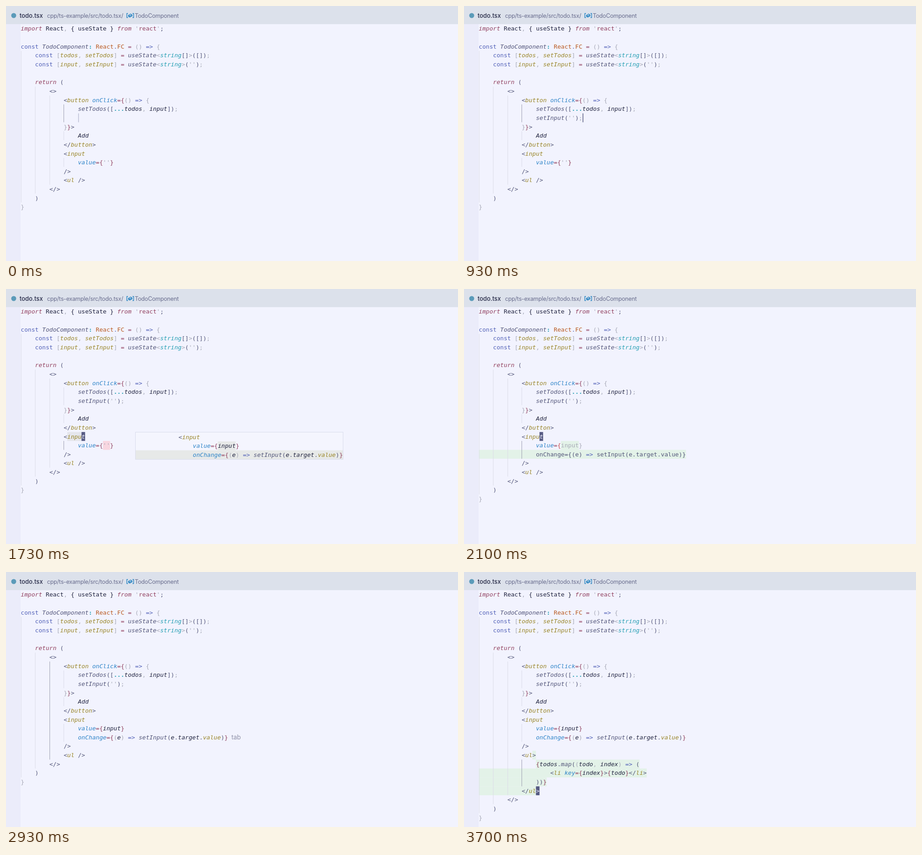
These frames come from a looping animation (997 by 562 pixels, 3.73 s). An HTML page with a canvas:

```html
<!DOCTYPE html>
<html lang="en">
<head>
<meta charset="utf-8">
<title>Editor completion</title>
<style>
html, body { margin: 0; width: 100%; height: 100%; overflow: hidden; background: #f2f3fe; }
canvas { display: block; }
</style>
</head>
<body>
<canvas id="stage" width="997" height="562"></canvas>
<script>
const ctx = document.getElementById('stage').getContext('2d');
const LOOP = 3730, LEFT = 32.6, TOP = 40.1, CHAR = 7.88, ROW = 19.65;
const MONO = '13.09px "DejaVu Sans Mono", monospace';
const SANS = 'Inter, sans-serif';
const BG = '#f2f3fe', GREEN = '#e3f2e8', PREVIEW = '#e7e9e8', PINK = '#f8d6e0';

// Event times in ms
const KEYS = [130, 220, 310], GHOST = 400, ERROR = 470, ACCEPT_CALL = 700, FIXED = 930;
const HINT_1 = 1030, JUMP_1 = 1210, POPUP_1 = 1240, HINT_1_OFF = 1310, ACCEPT_1 = 2070;
const HINT_2 = 2730, JUMP_2 = 2910, POPUP_2 = 2970, ACCEPT_2 = 3600;

// Markup: segments split by "|", first letter is the colour; upper case means italic.
const COLORS = {
  m: '#91405f', d: '#20233f', g: '#a7a9b7', s: '#53567a', b: '#5261b8', t: '#249eb3',
  k: '#249eb3', o: '#b9591f', y: '#998527', a: '#2e84c8', r: '#cb4545', h: '#8e90a4'
};

const HEAD = [
  [0, "Mimport|d React|g,|d { useState } |Mfrom|g '|mreact|g'|s;"],
  [0, ''],
  [0, 'bconst|S TodoComponent|k:|o React|b.|oFC|m =|g ()|b =>|g {'],
  [4, 'bconst|g [|Ytodos|g,|Y setTodos|g]|m =|S useState|g<|Tstring|s[]|g>|s([])|g;'],
  [4, "bconst|g [|Yinput|g,|Y setInput|g]|m =|S useState|g<|Tstring|g>|s(|g''|s)|g;"],
  [0, ''],
  [4, 'Mreturn|s ('],
  [8, 's<>'],
  [12, 's<|Ybutton|A onClick|m={|g()|b =>|g {'],
  [16, 'SsetTodos|s([|k...|Dtodos|g,|D input|s])|g;']
];
const MIDDLE = [
  [12, 'g}|m}|s>'],
  [16, 'DAdd'],
  [12, 's</|Ybutton|s>'],
  [12, 's<|Yinput']
];
const TAIL = [[8, 's</>'], [4, 's)'], [0, 'g}']];
const VALUE_OLD = "Avalue|m={|g''|m}";
const INPUT_RAW = [
  [12, 's<input'],
  [16, 'svalue={input}'],
  [16, 'sonChange={(e) |b=>|s setInput(e.target.value)}']
];
const INPUT_NEW = [
  [12, 's<|Yinput'],
  [16, 'Avalue|m={|Dinput|m}'],
  [16, 'AonChange|m={|g(|De|g) |b=>|S setInput|s(|De|s.|Dtarget|s.|Yvalue|s)|m}']
];
const LIST_NEW = [
  [12, 's<|Yul|s>'],
  [16, 'm{|Dtodos|s.|Smap|s(|g(|Dtodo|g,|D index|g)|b =>|s ('],
  [20, 's<|Yli|A key|m={|Dindex|m}|s>|m{|Dtodo|m}|s</|Yli|s>'],
  [16, 's))|m}'],
  [12, 's</|Yul|s>']
];

const during = (t, from, to) => t >= from && t < to;
const colX = col => LEFT + col * CHAR;
const rowY = row => TOP + row * ROW;

function rect(x, y, w, h, color) {
  ctx.fillStyle = color;
  ctx.fillRect(x, y, w, h);
}

function label(str, x, y, color, font) {
  ctx.font = font;
  ctx.fillStyle = color;
  ctx.fillText(str, x, y);
}

function drawCode([indent, markup], originX, top) {
  let col = indent;
  for (const part of markup ? markup.split('|') : []) {
    const key = part[0], lower = key.toLowerCase(), str = part.slice(1);
    const style = (key !== lower ? 'italic ' : '') + (key === 'k' ? 'bold ' : '');
    label(str, originX + col * CHAR, top + 14.3, COLORS[lower], style + MONO);
    col += str.length;
  }
}

// Background of a run of characters
function mark(row, from, to, color) {
  rect(colX(from), rowY(row), (to - from) * CHAR, ROW, color);
}

function guide(col, first, last, active) {
  rect(Math.round(colX(col)), rowY(first), 1, (last - first + 1) * ROW, active ? '#9c9eb0' : '#dbdce8');
}

function block(row, col, char, italic) {
  mark(row, col, col + 1, '#565a83');
  label(char, colX(col), rowY(row) + 14.3, '#f2f3fe', (italic ? 'italic ' : '') + MONO);
}

function hint(row, col) {
  label('tab', colX(col) + 7.5, rowY(row) + 14.8, '#8f91a8', '13.8px ' + SANS);
}

// Floating preview; marks are [line, from column, to column]
function popup(x, row, cols, lines, marks) {
  const y = rowY(row), w = cols * CHAR + 1, h = lines.length * ROW + 1;
  rect(x, y, w, h, '#f4f5fe');
  for (const [line, from, to] of marks)
    rect(x + from * CHAR, y + 1 + line * ROW, (to - from) * CHAR, ROW, PREVIEW);
  lines.forEach((line, i) => drawCode(line, x, y + 1 + i * ROW));
  ctx.strokeStyle = '#d8dcec';
  ctx.lineWidth = 1;
  ctx.strokeRect(Math.round(x) - .5, Math.round(y) + .5, Math.round(w), Math.round(h));
}

function squiggle(row, from, to) {
  const y = rowY(row) + 17.5;
  ctx.beginPath();
  for (let x = colX(from), i = 0; x <= colX(to); x += 2, i++) ctx.lineTo(x, y + (i % 2 ? -1.2 : 1.2));
  ctx.strokeStyle = '#d2653e';
  ctx.lineWidth = 1.1;
  ctx.stroke();
}

function drawHeader(error) {
  rect(0, 0, 997, 40, '#dce1eb');
  ctx.beginPath();
  ctx.arc(17, 21, 5.5, 0, Math.PI * 2);
  ctx.fillStyle = '#5b9bb9';
  ctx.fill();
  const shift = error ? 12 : 0, path = '12.7px ' + SANS;
  label('todo.tsx', 30, 25.6, error ? '#bd4530' : '#262a47', '500 13.2px ' + SANS);
  if (error) label('1', 89.5, 25.6, '#bd4530', '500 12.5px ' + SANS);
  ctx.letterSpacing = '-0.25px';
  label('cpp/ts-example/src/todo.tsx/', 90.5 + shift, 25.6, '#696d8e', path);
  label('TodoComponent', 284 + shift, 25.6, '#696d8e', path);
  ctx.letterSpacing = '0px';
  ctx.save();
  ctx.translate(274 + shift, 21);
  ctx.strokeStyle = '#2583c2';
  ctx.lineWidth = 1.4;
  ctx.stroke(new Path2D('M-5-4.5H-7.5V4.5H-5M5-4.5H7.5V4.5H5M-4-.5L1-3.5L4-1.5V1L-1 3.5L-4 2ZM-4-.5L-1 1L4-1.5M-1 1V3.5'));
  ctx.restore();
}

function codeLines(t) {
  const typed = 'set'.slice(0, KEYS.filter(k => t >= k).length);
  let call = typed && 'D' + typed;
  if (t >= GHOST) call += "|HInput('');";
  if (t >= ACCEPT_CALL) call = "SsetInput|s(|g''|s)|g;";

  let attrs = [[16, VALUE_OLD]];
  if (t >= ACCEPT_1) attrs = [[16, 'Avalue|m=|r{|ginput}'], INPUT_RAW[2]];
  if (t >= ACCEPT_1 + 90) attrs = INPUT_NEW.slice(1);

  const list = t >= ACCEPT_2 ? LIST_NEW : [[12, 's<|Yul|s />']];
  return [...HEAD, [16, call], ...MIDDLE, ...attrs, [12, 's/>'], ...list, ...TAIL];
}

function drawMarks(t) {
  if (during(t, POPUP_1, ACCEPT_1)) {
    mark(14, 13, 17, '#e5e6ec');
    mark(15, 23, 25, PINK);
  }
  if (during(t, ACCEPT_1, 2600)) {
    ctx.globalAlpha = Math.min(1, (2600 - t) / 300);
    mark(15, 23, 28, GREEN);
    mark(16, 0, 58, GREEN);
    ctx.globalAlpha = 1;
  }
  if (during(t, POPUP_2, ACCEPT_2)) mark(18, 16, 17, PINK);
  if (t >= ACCEPT_2) {
    mark(18, 15, 16, GREEN);
    mark(19, 16, 45, GREEN);
    mark(20, 0, 47, GREEN);
    mark(21, 0, 19, GREEN);
    mark(22, 0, 17, GREEN);
  }
}

function drawGuides(t) {
  const attr = t >= ACCEPT_1 ? 1 : 0, list = t >= ACCEPT_2, added = attr + (list ? 4 : 0);
  guide(0, 3, 19 + added);
  guide(4, 7, 18 + added);
  guide(8, 8, 17 + added, during(t, JUMP_2, ACCEPT_2));
  guide(12, 9, 10, t < JUMP_1);
  guide(12, 12, 12);
  guide(12, 15, 15 + attr, during(t, JUMP_1, JUMP_2));
  if (list) guide(12, 19, 21, true);
}

function drawCaret(t) {
  if (t < JUMP_1) {
    const col = t >= ACCEPT_CALL ? 29 : 16 + KEYS.filter(k => t >= k).length;
    const alpha = t < KEYS[0] ? .3 : during(t, 500, ACCEPT_CALL) ? 0 : .9;
    ctx.globalAlpha = alpha;
    rect(colX(col) + .3, rowY(10), 2, ROW, '#6c6f92');
    ctx.globalAlpha = 1;
  } else if (during(t, POPUP_1, ACCEPT_1 + 90)) block(14, 17, 't', true);
  else if (during(t, ACCEPT_1 + 90, JUMP_2)) block(16, 57, '}');
  else if (during(t, POPUP_2, ACCEPT_2)) block(18, 17, '>');
  else if (t >= ACCEPT_2) block(22, 16, '>');
}

function draw(t) {
  rect(0, 0, 997, 562, BG);
  rect(0, 40, 32, 522, '#ebecfa');
  drawHeader(during(t, ERROR, FIXED));
  drawMarks(t);
  drawGuides(t);
  codeLines(t).forEach((line, row) => drawCode(line, LEFT, rowY(row)));
  if (during(t, ERROR, ACCEPT_CALL)) squiggle(10, 16, 19);
  if (during(t, HINT_1, HINT_1_OFF)) hint(11, 15);
  if (during(t, HINT_2, POPUP_2)) hint(16, 58);
  drawCaret(t);
  if (during(t, POPUP_1, ACCEPT_1))
    popup(286, 14, 58, t < POPUP_1 + 90 ? INPUT_RAW : INPUT_NEW, [[1, 23, 28], [2, 0, 58]]);
  if (during(t, POPUP_2, ACCEPT_2))
    popup(223, 18, 47, LIST_NEW, [[0, 15, 16], [1, 0, 45], [2, 0, 47], [3, 0, 19], [4, 0, 17]]);
}

function tick() {
  draw(performance.now() % LOOP);
  requestAnimationFrame(tick);
}
tick();
</script>
</body>
</html>
```
